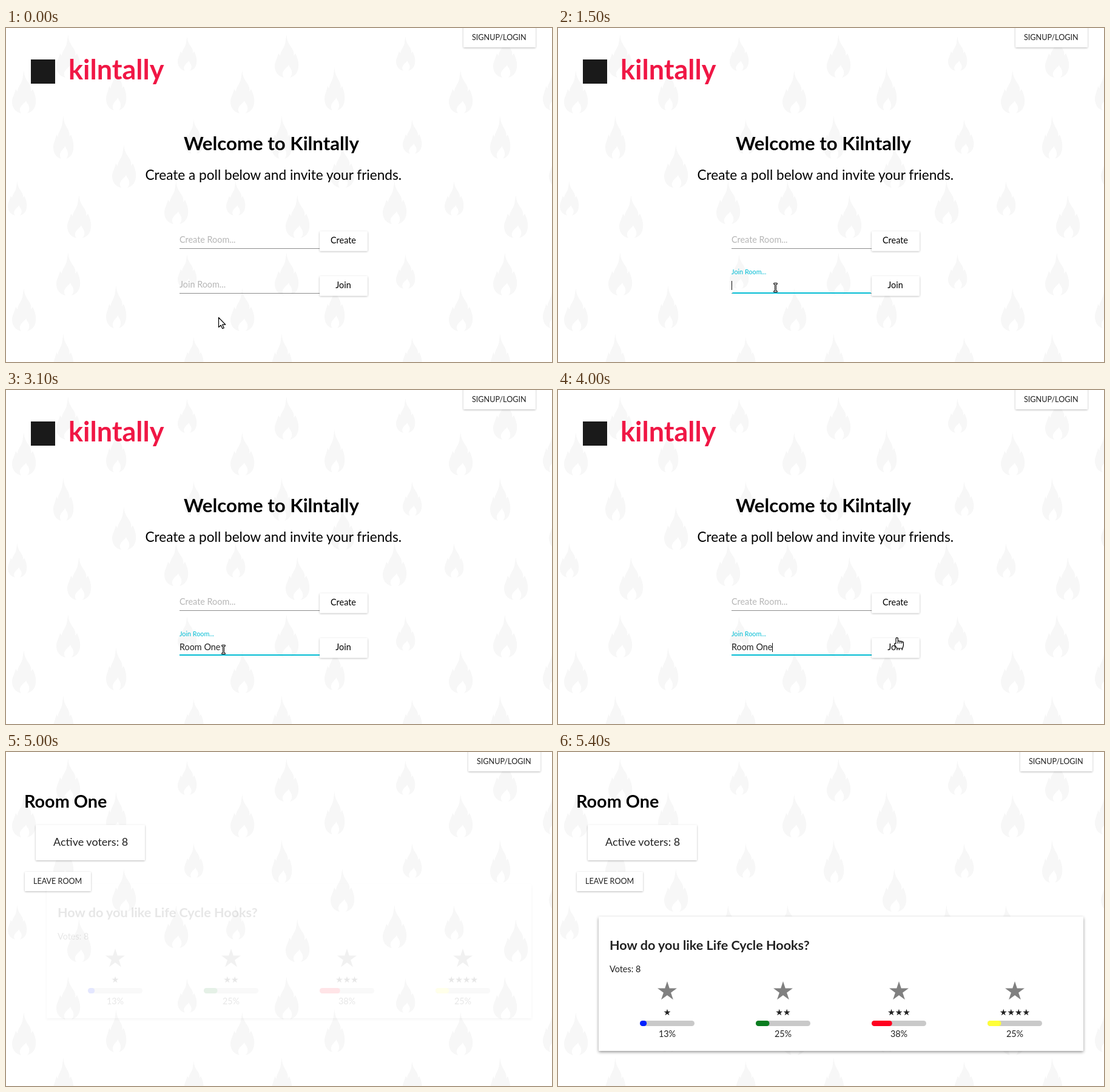
Animation, 900 px wide and 552 px high, one loop 8 s. Source, as an HTML page:

```html
<!DOCTYPE html>
<html lang="en">
<head>
<meta charset="utf-8">
<title>Poll room</title>
<style>
  html, body { margin: 0; width: 100%; height: 100%; overflow: hidden; background: #fff; }
  svg { display: block; width: 900px; height: 552px; font-family: Lato, sans-serif; }
  text { white-space: pre; }
</style>
</head>
<body>
<svg id="stage" viewBox="0 0 900 552" xmlns="http://www.w3.org/2000/svg">
  <defs>
    <pattern id="flames" width="360" height="360" patternUnits="userSpaceOnUse"></pattern>
    <filter id="low" x="-20%" y="-30%" width="140%" height="170%">
      <feDropShadow dx="0" dy="1" stdDeviation="1.7" flood-opacity=".28"/>
    </filter>
    <filter id="high" x="-3%" y="-10%" width="106%" height="120%">
      <feDropShadow dx="0" dy="2" stdDeviation="2.4" flood-opacity=".42"/>
    </filter>
  </defs>
  <rect width="900" height="552" fill="url(#flames)"/>
  <g id="home"></g>
  <g id="room"></g>
  <g id="pointer"></g>
</svg>
<script>
const LOOP = 8000, STEP = 100;
const TEAL = [0, 188, 212], HINT = [182, 182, 182];
const $ = id => document.getElementById(id);
const clamp = v => Math.max(0, Math.min(1, v));
const mix = (a, b, k) => a + (b - a) * k;
const blend = (a, b, k) => `rgb(${a.map((v, i) => Math.round(mix(v, b[i], k)))})`;

function add(parent, tag, attrs, content) {
  const el = document.createElementNS('http://www.w3.org/2000/svg', tag);
  for (const key in attrs) el.setAttribute(key, attrs[key]);
  if (content !== undefined) el.textContent = content;
  return parent.appendChild(el);
}
const write = (parent, x, y, size, content, attrs) =>
  add(parent, 'text', { x, y, 'font-size': size, ...attrs }, content);
const box = (parent, x, y, width, height, fill, attrs) =>
  add(parent, 'rect', { x, y, width, height, fill, ...attrs });
const panel = (parent, x, y, w, h, shadow = 'low') =>
  box(parent, x, y, w, h, '#fff', { rx: 1.5, filter: `url(#${shadow})` });

const BOLD = { 'font-weight': 700 };
const CENTER = { 'text-anchor': 'middle' };

// Background
const FLAME = 'M20 0C19 9 24 16 28 22C31 27 32 30 31 35L34 31C38 39 40 47 39 54C38 63 33 69 25 71' +
  'C28 68 29 64 28 60C27 56 24 54 23 50C21 54 19 54 16 58C12 62 12 67 15 71C5 69 0 61 0 52' +
  'C0 45 4 40 6 31L9 35C9 28 15 23 17 15C18 10 18 5 20 0Z';
const LARGE = [1, 1], SLIM = [.85, 1], SMALL = [.8, .8];
[
  [83, 11, LARGE], [283, 14, SMALL], [10, 70, LARGE], [165, 65, SLIM], [78, 145, SLIM],
  [294, 151, SMALL], [175, 193, LARGE], [3, 253, SMALL], [261, 253, LARGE], [101, 276, LARGE]
].forEach(([x, y, scale]) => add($('flames'), 'path',
  { d: FLAME, fill: '#f7f7f7', transform: `translate(${x} ${y}) scale(${scale})` }));

// Start page
const home = $('home');
box(home, 41, 52, 40, 40, '#1a1a1a');
write(home, 103, 85, 45, 'kilntally', { ...BOLD, fill: '#f01745' });
write(home, 293, 202, 31.2, 'Welcome to Kilntally', BOLD);
write(home, 229.5, 251, 22.6, 'Create a poll below and invite your friends.');
panel(home, 754, -4, 119, 36);
write(home, 768, 20, 12.6, 'SIGNUP/LOGIN', { fill: '#222' });

write(home, 286, 355, 14.4, 'Create Room...', { fill: blend(HINT, TEAL, 0) });
box(home, 286, 364, 231, 1, '#8c8c8c');
box(home, 286, 438, 231, 1, '#8c8c8c');
const focusLine = box(home, 286, 437, 231, 2, '#00bcd4');
const label = write(home, 0, 0, 14.4, 'Join Room...');
const typed = write(home, 286, 430, 14.4, '', { fill: '#222' });
const caret = box(home, 0, 418, 1, 15, '#111');
[['Create', 336], ['Join', 410]].forEach(([name, y]) => {
  panel(home, 517, y, 79, 32.4);
  write(home, 556, y + 20, 14.4, name, CENTER);
});

// Room page
const room = $('room');
write(room, 30, 92, 28.8, 'Room One', BOLD);
panel(room, 762, -4, 119, 36);
write(room, 776, 20, 12.6, 'SIGNUP/LOGIN', { fill: '#222' });
panel(room, 49, 120.5, 180, 58.5);
write(room, 78, 155, 18, 'Active voters: 8', { fill: '#222' });
panel(room, 31, 198, 109, 32);
write(room, 45, 218, 12.6, 'LEAVE ROOM', { fill: '#222' });

const card = add(room, 'g', { fill: '#222' });
panel(card, 67, 272, 799, 222, 'high');
write(card, 85, 327, 21.6, 'How do you like Life Cycle Hooks?', BOLD);
write(card, 85, 364, 14.4, 'Votes: 8');

function star(parent, cx, cy, radius, fill) {
  const points = Array.from({ length: 10 }, (_, i) => {
    const r = i % 2 ? radius * .382 : radius, a = i * Math.PI / 5;
    return [cx + r * Math.sin(a), cy - r * Math.cos(a)].map(v => v.toFixed(2));
  });
  add(parent, 'polygon', { points: points.join(' '), fill });
}
[[1, '#0021ff'], [2, '#0a7d20'], [3, '#ff0020'], [2, '#ffff38']].forEach(([votes, color], i) => {
  const cx = 180 + 191 * i, share = votes / 8;
  star(card, cx, 395.7, 16.8, '#808080');
  for (let n = 0; n <= i; n++) star(card, cx + (n - i / 2) * 12.5, 430.5, 5.8, '#222');
  box(card, cx - 45, 444, 90, 9, '#c9c9c9', { rx: 4.5 });
  box(card, cx - 45, 444, 90 * share, 9, color, { rx: 4.5 });
  write(card, cx, 471, 14.4, Math.round(share * 100) + '%', CENTER);
});

// Pointer shapes, each with its hot spot at the origin
const pointer = $('pointer');
const INK = { fill: '#fff', stroke: '#000', 'stroke-width': 1.2, 'stroke-linejoin': 'round' };
const shapes = { arrow: add(pointer, 'g'), beam: add(pointer, 'g'), hand: add(pointer, 'g') };
add(shapes.arrow, 'path', { d: 'M.5 .5V16.5L4.2 13.2 6.8 18.8 9.3 17.7 6.7 12.2H11.8Z', ...INK });
const BEAM = 'M-2.5-6.5H1.5M-.5-6.5V6.5M-2.5 6.5H1.5';
[['#000', 3], ['#fff', 1]].forEach(([stroke, width]) => add(shapes.beam, 'path',
  { d: BEAM, fill: 'none', stroke, 'stroke-width': width, 'stroke-linecap': 'round' }));
add(shapes.hand, 'path', {
  d: 'M-2 9V1a1.7 1.7 0 0 1 3.4 0V6a1.6 1.6 0 0 1 3.2.3a1.5 1.5 0 0 1 3 .5a1.5 1.5 0 0 1 2.8.8V12L9 17H0' +
    'L-4.5 10.5Q-4 8-2 9ZM1.4 6V9M4.6 6.3V9M7.6 6.8V9', ...INK
});

// Time, x, y
const PATH = [
  [500, 350, 478], [600, 351, 477], [700, 354, 468], [800, 356, 455], [900, 358, 440], [1000, 359, 429],
  [3200, 359, 429], [3300, 364, 427], [3400, 380, 422], [3500, 410, 412], [3600, 446, 400],
  [3700, 485, 394], [3800, 520, 394], [3900, 546, 402], [4000, 559, 410], [4100, 560, 411],
  [4200, 560, 414], [4300, 560, 418]
];
const KEYS = [[1700, 'R'], [1800, 'o'], [1900, 'o'], [2000, 'm'], [2100, ' '], [2300, 'O'], [2400, 'n'], [3100, 'e']];

function along(path, t) {
  const next = path.findIndex(p => p[0] > t);
  if (next === 0) return path[0].slice(1);
  if (next < 0) return path[path.length - 1].slice(1);
  const a = path[next - 1], b = path[next], k = (t - a[0]) / (b[0] - a[0]);
  return [mix(a[1], b[1], k), mix(a[2], b[2], k)];
}

function drawPointer(t) {
  const [x, y] = along(PATH, t);
  const kind = x >= 517 && y >= 410 ? 'hand' : x < 517 && y > 400 && y < 445 ? 'beam' : 'arrow';
  for (const name in shapes) shapes[name].style.display = name === kind ? '' : 'none';
  pointer.setAttribute('transform', `translate(${x} ${y})`);
}

function drawField(t) {
  const focus = t < 1300 ? 0 : 1 - (1 - clamp((t - 1200) / 450)) ** 4;
  const blurred = t >= 4600;
  const line = blurred ? .8 : focus;
  label.setAttribute('transform', `translate(286 ${mix(429, 407, focus)}) scale(${mix(1, .75, focus)})`);
  label.setAttribute('fill', blend(HINT, TEAL, blurred ? 0 : focus));
  focusLine.setAttribute('x', 286 + 115.5 * (1 - line));
  focusLine.setAttribute('width', 231 * line);
  typed.textContent = KEYS.filter(key => key[0] <= t).map(key => key[1]).join('');
  const caretOn = t >= 1300 && t < 3100 || t >= 3600 && t < 4200;
  caret.style.display = caretOn ? '' : 'none';
  caret.setAttribute('x', Math.round(286 + typed.getComputedTextLength()));
}

function drawCard(t) {
  const shown = t < 5000 ? .04 : t < 5300 ? .1 : t < 5400 ? .75 : 1;
  card.setAttribute('opacity', shown);
  card.setAttribute('transform', `translate(0 ${Math.round(-60 * (1 - shown))})`);
}

function render(ms) {
  const t = Math.floor(ms % LOOP / STEP) * STEP;
  const inRoom = t >= 4800;
  home.style.display = pointer.style.display = inRoom ? 'none' : '';
  room.style.display = inRoom ? '' : 'none';
  if (inRoom) {
    drawCard(t);
  } else {
    drawField(t);
    drawPointer(t);
  }
}

const start = performance.now();
function tick() {
  render(performance.now() - start);
  requestAnimationFrame(tick);
}
tick();
</script>
</body>
</html>
```
